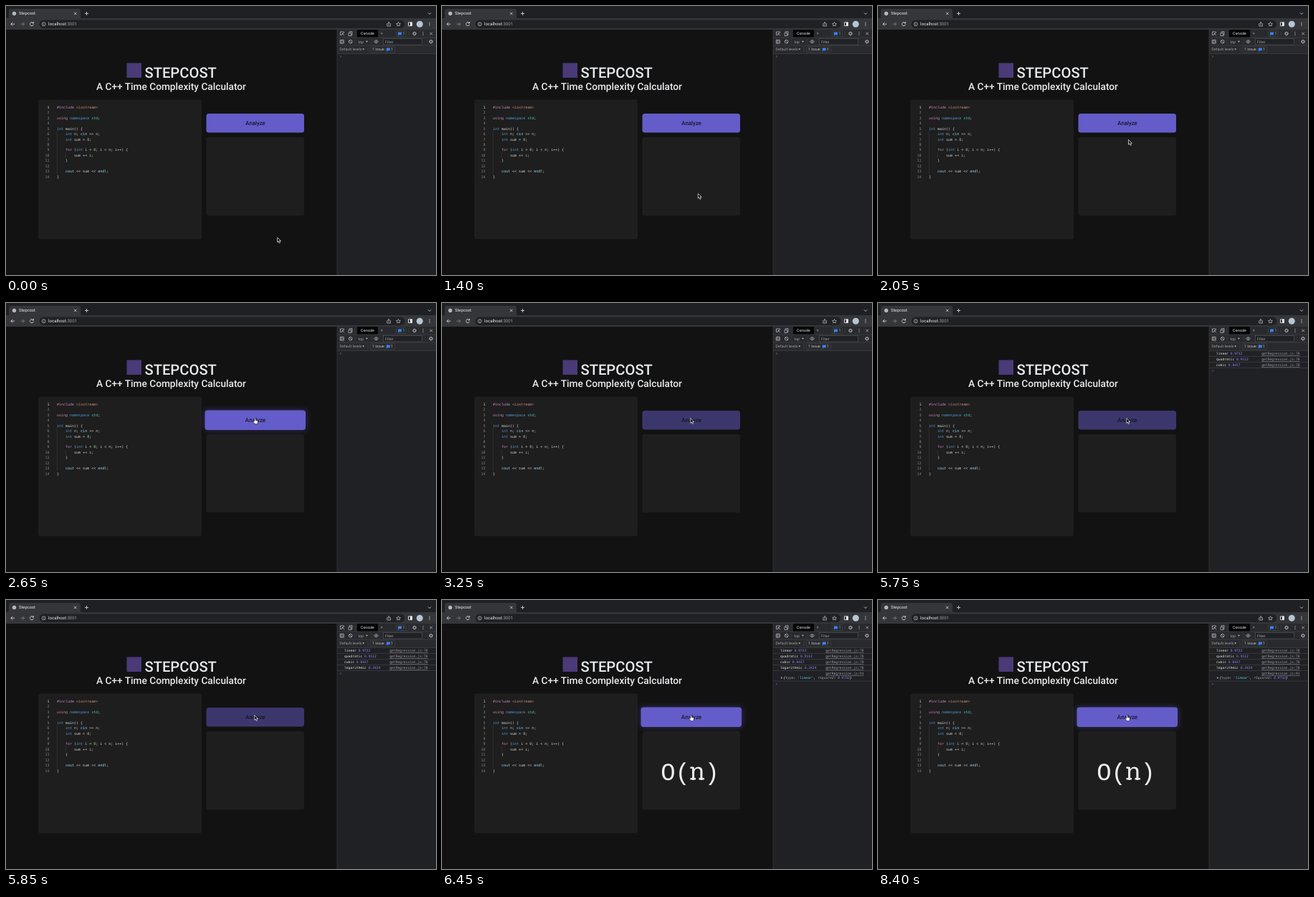
An HTML page that plays this animation: 600x375 px, repeating every 8450 ms.

```html
<!DOCTYPE html>
<html lang="en">
<head>
<meta charset="utf-8">
<title>Stepcost</title>
<style>
  html, body { margin: 0; width: 100%; height: 100%; overflow: hidden; background: #121212; }
  svg { display: block; width: 600px; height: 375px; text-rendering: geometricPrecision; }
  text { font-family: Roboto, sans-serif; fill: #e8eaed; white-space: pre; }
  .code text { font: 5px "DejaVu Sans Mono", monospace; fill: #d4d4d4; }
  .log text { font: 4.66px "DejaVu Sans Mono", monospace; }
  .ui { font-size: 5.2px; }
  .icon { fill: none; stroke: #b4b8bd; stroke-width: .8; }
  .line { stroke: #43464b; stroke-width: .6; }
  .k { fill: #c586c0; } .t { fill: #569cd6; } .s { fill: #ce9178; }
  .c { fill: #4ec9b0; } .v { fill: #9cdcfe; } .n { fill: #b5cea8; }
  .num { fill: #9980ff; } .str { fill: #5cd5e0; } .dim { fill: #9aa0a6; }
</style>
</head>
<body>
<svg viewBox="0 0 600 375">
  <rect width="600" height="375" fill="#121212"/>

  <!-- browser bar -->
  <rect width="600" height="18" fill="#1f2023"/>
  <path d="M2 17.5q2 0 2-2V7q0-3 3-3h94q3 0 3 3v8.500q0 2 2 2z" fill="#35363a"/>
  <rect y="17" width="600" height="16" fill="#35363a"/>
  <rect x="46.500" y="19.500" width="510" height="11.500" rx="5.750" fill="#202124"/>
  <circle cx="11.500" cy="10.500" r="2.700" fill="#b4b8bd"/>
  <text x="18" y="12.400" font-size="5.8">Stepcost</text>
  <text x="59" y="27.300" font-size="6.1">localhost<tspan class="dim">:3001</tspan></text>
  <g class="icon">
    <path d="M95 8.800l3.400 3.400m0-3.400l-3.400 3.400M110 10.500h5m-2.500-2.500v5M589 9.500l2 2 2-2" stroke="#e0e2e5"/>
    <path d="M12 25.200H6.800m2.500-2.500l-2.500 2.500 2.500 2.500" stroke="#e0e2e5"/>
    <path d="M20.500 25.200h5m-2.400-2.500l2.500 2.500-2.500 2.500" stroke="#85898f"/>
    <path d="M38 23.700a2.500 2.500 0 1 0 .4 2M38.400 22v2h-2" stroke="#e0e2e5"/>
    <circle cx="52.700" cy="25.300" r="2.500"/>
    <path d="M52.700 24.800v1.900m0-3.100v.6M532.500 24.500h-.7v3.500h4.600v-3.500h-.7M534.100 26.500v-4m-1.400 1.400l1.400-1.400 1.400 1.400"/>
    <path d="M547.500 22.500l.9 1.900 2 .2-1.500 1.400.4 2-1.800-1-1.800 1 .4-2-1.500-1.400 2-.2z"/>
    <path d="M561.500 22.800h5v4.800h-5z" stroke="#f1f3f4"/>
  </g>
  <rect x="564" y="22.800" width="2.600" height="4.800" fill="#f1f3f4"/>
  <circle cx="577.300" cy="25.200" r="4.500" fill="#b7c5d3"/>

  <!-- page -->
  <rect x="168.500" y="79.500" width="20.500" height="20.500" fill="#4a3a78"/>
  <text x="193.500" y="100" font-size="20.2" font-weight="500" fill="#fff">STEPCOST</text>
  <text x="126" y="117.300" font-size="13.7" font-weight="500" fill="#fff">A C++ Time Complexity Calculator</text>
  <rect x="45" y="130.500" width="228" height="194.500" rx="3" fill="#1e1e1e"/>
  <rect x="279.500" y="183" width="136.500" height="109.300" rx="3" fill="#1e1e1e"/>
  <g class="code" id="code"></g>
  <g id="button">
    <rect id="glow" x="279" y="149.500" width="138" height="28" rx="4" fill="#645cc8" style="filter:blur(4px)"/>
    <rect x="279.500" y="150" width="136.500" height="26.500" rx="3.500" fill="#645cc8"/>
    <text x="348" y="165.700" font-size="7.9" text-anchor="middle" style="fill:#050508">Analyze</text>
  </g>
  <g id="result">
    <text x="346" y="250.500" font-size="34" text-anchor="middle" style="font-family:'Liberation Mono',monospace;fill:#eee">O(n)</text>
    <path d="M346.500 249.300h7.500m4.500 0h7.500M346.500 233.700h4" stroke="#eee" stroke-width="2.400"/>
  </g>

  <!-- console -->
  <rect x="462" y="33" width="138" height="342" fill="#202124"/>
  <rect x="462" y="33" width="138" height="33.500" fill="#292a2d"/>
  <rect x="490" y="33" width="29" height="10.800" fill="#050505"/>
  <rect x="526.500" y="45.500" width="54" height="8.500" fill="#202124" stroke="#55585d" stroke-width=".6"/>
  <path class="line" d="M462 33v342M462 44h138M462 55h138M462 66.500h138M487 35v7M487 46v7M510 46v7M562 35v7M505 57v7" fill="none"/>
  <rect x="508.500" y="56.300" width="34" height="8.400" rx="1" fill="none" class="line"/>
  <rect x="544.500" y="34.500" width="14" height="8" rx="1" fill="none" class="line"/>
  <g class="ui">
    <text x="495" y="40.300">Console</text>
    <text x="522.500" y="40.300" font-size="7" class="dim">»</text>
    <text x="553.500" y="40.400" style="fill:#8ab4f8">1</text>
    <text x="491.500" y="51.500" class="dim">top</text>
    <text x="529" y="51.700" class="dim">Filter</text>
    <text x="465.500" y="62.400" class="dim">Default levels</text>
    <text x="511" y="62.400" style="fill:#c5c9ce">1 Issue:</text>
    <text x="537" y="62.400" style="fill:#c5c9ce">1</text>
  </g>
  <path d="M502 48.700h3l-1.500 2zM497.300 59.500h3l-1.500 2z" fill="#b4b8bd"/>
  <path d="M547 36.500h5v3.700h-3.500l-1.500 1.300zM530.800 58.500h5v3.700h-3.500l-1.500 1.300z" fill="#3b82f0"/>
  <g class="icon">
    <path d="M471.500 37.500v-1.500h-5v4.500h2M469 38.200l3 3m-3-.8v-2.200h2.200M478 37.500h3.500v4h-3.500zM479 36.500v-.8h4v5h-1"/>
    <path d="M466.300 47.300h5v4.800h-5zM468 47.300v4.800M469.400 48.500l1.200 1.200-1.200 1.200M479 48l3.400 3.400"/>
    <circle cx="480.700" cy="49.700" r="2.400"/>
    <path d="M513.500 49.700q3-4 6 0-3 4-6 0z"/><circle cx="516.500" cy="49.700" r=".7"/>
    <path d="M591.400 36.700l3.600 3.600m0-3.600l-3.600 3.600"/>
  </g>
  <g id="small"></g>
  <g class="log" id="log"></g>
  <path id="prompt" d="M0-1.300l1.300 1.300-1.300 1.300" fill="none" stroke-width=".8"/>

  <g id="cursor" stroke-linejoin="round">
    <path id="arrow" d="M0 0v6.600l1.500-1.300 1.100 2.500 1.300-.6-1.100-2.400h2z" fill="#000" stroke="#fff" stroke-width=".7"/>
    <path id="hand" d="M-.1 .6q.9-.9 1.500 0v2.200l2.600.5q.8.200.7 1.200l-.5 2.700q-.2.700-.8.700h-2.300q-.5 0-.9-.6l-2-2.600q.4-1.100 1.700-.2z" fill="#fff" stroke="#111" stroke-width=".5"/>
  </g>
</svg>
<script>
const el = id => document.getElementById(id);
const span = (cls, s) => `<tspan class="${cls}">${s}</tspan>`;
const clamp = p => Math.max(0, Math.min(1, p));
const ramp = (t, a, b) => clamp((t - a) / (b - a));
const ease = p => p * p * (3 - 2 * p);

// Editor: k/t/s/c/v/n mark the token class in [class:text]
const source = `[k:#include] [s:&lt;iostream&gt;]

[k:using] [t:namespace] [c:std];

[t:int] main() {
    [t:int] n; [v:cin] >> n;
    [t:int] sum = [n:0];

    [k:for] ([t:int] i = [n:0]; i &lt; n; i++) {
        sum += i;
    }

    [v:cout] &lt;&lt; sum &lt;&lt; [v:endl];
}`.split('\n');
el('code').innerHTML = '<path d="M71.300 174.500v60M83.300 204.500v7.500" stroke="#404040" stroke-width=".5"/>' +
  source.map((line, i) => {
    const y = 142.700 + 7.47 * i;
    const indent = line.search(/\S|$/);
    const body = line.trim().replace(/\[(\w):([^\]]+)\]/g, (_, c, s) => span(c, s));
    return `<text x="60.500" y="${y}" text-anchor="end" style="fill:${i ? '#858585' : '#d0d0d0'}">${i + 1}</text>` +
      `<text x="${71 + 3.01 * indent}" y="${y}">${body}</text>`;
  }).join('');

const gear = (x, y) => `<g fill="none" stroke="#b4b8bd"><circle cx="${x}" cy="${y}" r="1.700" stroke-width="1"/>` +
  `<circle cx="${x}" cy="${y}" r="2.500" stroke-width=".9" stroke-dasharray=".98 .98"/></g>`;
const dots = (x, y) => [-2, 0, 2].map(d => `<circle cx="${x}" cy="${y + d}" r=".6" fill="#d0d3d7"/>`).join('');
el('small').innerHTML = gear(570, 38.5) + gear(593, 49.7) + dots(582, 38.5) + dots(591, 25.2);

// Console rows: time, top, height, link line, content
const fits = [['linear', '0.9732', 5500], ['quadratic', '0.9112', 5600], ['cubic', '0.8417', 5700], ['logarithmic', '0.2434', 5850]];
const rows = fits.map(([name, r, at], i) => ({
  at, top: 66.5 + 8 * i, h: 8, link: 78,
  html: `<text x="472" y="${72.3 + 8 * i}">${name} ${span('num', r)}</text>`
}));
rows.push({
  at: 5950, top: 98.5, h: 14.5, link: 91,
  html: '<path d="M473 107l2.400 1.500-2.400 1.500z" fill="#9aa0a6"/><text x="476.500" y="110.300" font-style="italic" style="font-style:italic">{' +
    span('dim', 'type') + ': ' + span('str', "'linear'") + ', ' + span('dim', 'rSquared') + ': ' + span('num', '0.9732') + '}</text>'
});
el('log').innerHTML = rows.map(r => `<g>${r.html}<text class="dim" x="588.500" y="${r.top + 5.8}" text-anchor="end" ` +
  `text-decoration="underline">getRegression.js:${r.link}</text><path class="line" d="M462 ${r.top + r.h}h138"/></g>`).join('');
const rowNodes = [...el('log').children];

const show = (node, on) => node.setAttribute('visibility', on ? 'visible' : 'hidden');
const LOOP = 8450, STEP = 50, ENTER = 2150, CLICK = 3000, DONE = 5950;

function pointer(t) {
  const a = ramp(t, 800, 1400) ** 1.3;
  const b = 1 - (1 - ramp(t, 1400, 2400)) ** 1.3;
  return [378.7 - 21.4 * a - 10.5 * b, 322.7 - 61.2 * a - 100.8 * b];
}

function draw(t) {
  const off = ease(ramp(t, CLICK, CLICK + 250)) - ease(ramp(t, DONE, DONE + 250));
  const hover = ease(ramp(t, ENTER, ENTER + 250)) * (1 - off);
  const scale = 1 + .03 * hover;
  el('button').setAttribute('transform', `translate(347.750 163.250) scale(${scale}) translate(-347.750 -163.250)`);
  el('button').setAttribute('opacity', 1 - .5 * off);
  el('glow').setAttribute('opacity', .35 * hover);
  show(el('result'), t >= DONE);

  let end = 66.5;
  rows.forEach((r, i) => {
    show(rowNodes[i], t >= r.at);
    if (t >= r.at) end = r.top + r.h;
  });
  const active = t < STEP || t >= rows[0].at;
  el('prompt').setAttribute('transform', `translate(466.300 ${end + 4})`);
  el('prompt').setAttribute('stroke', active ? '#3f7de8' : '#777b80');

  const hand = t >= ENTER && t < CLICK || t >= DONE;
  el('cursor').setAttribute('transform', `translate(${pointer(t)})`);
  show(el('hand'), hand);
  show(el('arrow'), !hand);
}

const start = performance.now();
function tick() {
  const t = (performance.now() - start) % LOOP;
  draw(Math.floor(t / STEP) * STEP);
  requestAnimationFrame(tick);
}
tick();
</script>
</body>
</html>
```
